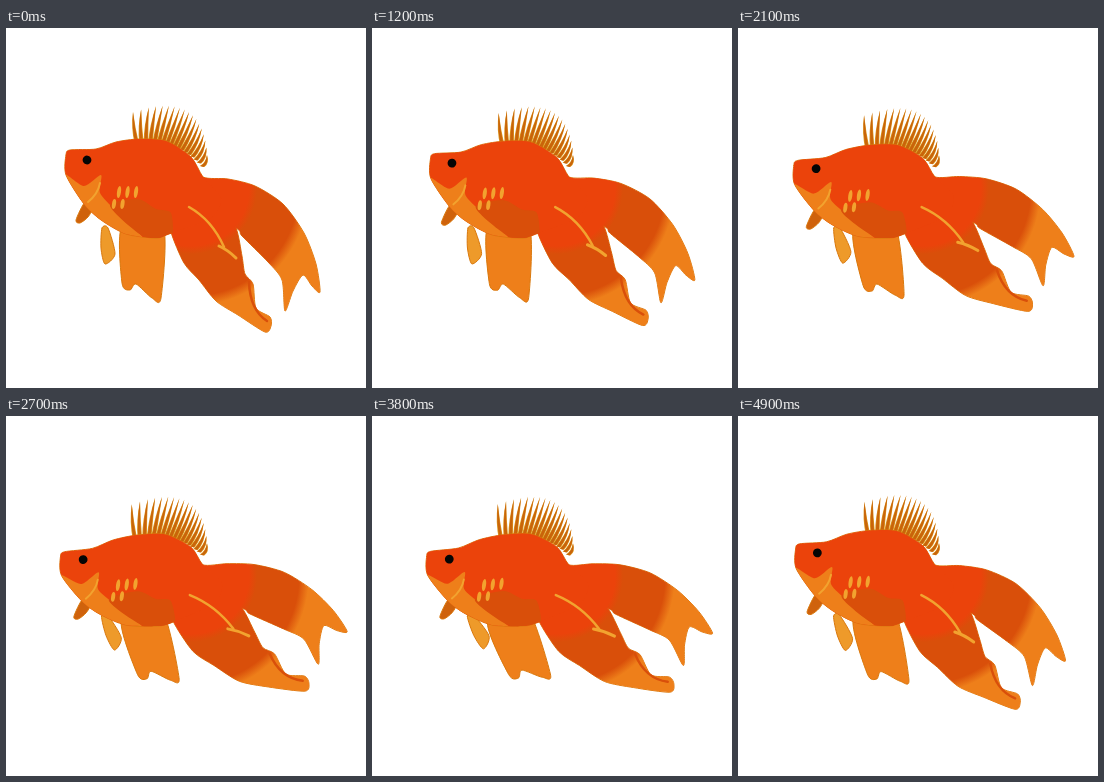
An HTML page with a canvas for the animation above (5000 ms loop, 360 by 360 pixels).

```html
<!DOCTYPE html>
<html lang="en">
<head>
<meta charset="utf-8">
<title>Goldfish</title>
<style>
html, body { margin: 0; width: 100%; height: 100%; overflow: hidden; background: #fff }
canvas { display: block; width: 360px; height: 360px }
</style>
</head>
<body>
<canvas width="360" height="360"></canvas>
<script>
const ctx = document.querySelector('canvas').getContext('2d');
const RED = '#eb430b', DARK = '#d94f0a', LIGHT = '#ee7f1a', GOLD = '#f2a32f', EDGE = '#d9780c';
const ROOT = [185, 160]; // the tail bends around this point

// Key points of the parts with the tail hanging.
const points = (...v) => v.flatMap((x, i) => i % 2 ? [] : [[x, v[i + 1]]]);
const BODY = points(60,127, 64,122, 90,121, 110,114, 133,111, 160,113, 185,129, 197,149, 215,170,
  205,190, 163,206, 150,210, 120,206, 95,192, 78,176, 60,147);
const UPPER = points(185,131, 197,149, 222,151, 249,158, 277,176, 298,205, 310,236, 314,264, 306,258,
  297,247, 287,263, 279,283, 276,252, 262,234, 236,208, 230,200, 180,170);
const LOWER = points(165,185, 190,165, 215,180, 230,200, 236,228, 239,246, 247,256, 250,280, 264,289,
  265,298, 259,304, 232,287, 210,273, 193,252, 178,235, 165,204);
const PELVIC = points(116,198, 116,255, 124,262, 130,256, 146,270, 155,270, 157,198);
const PECTORAL = points(96,200, 95,220, 99,236, 109,226, 102,200);
const SIDE_FIN = points(79,174, 70,192, 74,195, 82,189, 87,179);
const CHEEK = points(58,147, 78,158, 95,147, 94,165, 110,183, 140,215, 85,200);
const BELLY = points(104,178, 132,171, 150,181, 165,185, 165,212, 138,209);

// 0 = tail hanging, 1 = tail raised
const lift = t => (1 - Math.cos(Math.PI * (Math.max(t, 200) - 200) / 3000)) / 2;

function rotate([x, y], [cx, cy], angle) {
  const c = Math.cos(angle), s = Math.sin(angle), dx = x - cx, dy = y - cy;
  return [cx + dx * c + dy * s, cy + dy * c - dx * s];
}

// Behind the root the fish curls up, more so towards the tips; in front of it the head dips.
function bend([x, y], p) {
  const s = x - ROOT[0] + 0.7 * (y - ROOT[1]);
  return s > 0
    ? rotate([x, y], ROOT, 0.34 * p * (s / 185) ** 0.7)
    : [x - p * s * s * 0.00027, y - p * s * 0.1];
}

// Smooth closed curve through all points.
function outline(pts) {
  const n = pts.length, path = new Path2D(), s = 0.13;
  path.moveTo(...pts[0]);
  for (let i = 0; i < n; i++) {
    const [a, b, c, d] = [-1, 0, 1, 2].map(k => pts[(i + k + n) % n]);
    path.bezierCurveTo(b[0] + (c[0] - a[0]) * s, b[1] + (c[1] - a[1]) * s,
      c[0] - (d[0] - b[0]) * s, c[1] - (d[1] - b[1]) * s, ...c);
  }
  return path;
}

function fill(path, color) {
  ctx.fillStyle = color;
  ctx.fill(path);
}

function stroke(path, color = EDGE, width = 1) {
  ctx.strokeStyle = color;
  ctx.lineWidth = width;
  ctx.stroke(path);
}

function streak(p, width, color, ...coords) {
  const [a, b, c] = points(...coords).map(q => bend(q, p)), path = new Path2D();
  path.moveTo(...a);
  path.quadraticCurveTo(...b, ...c);
  stroke(path, color, width);
}

function oval([x, y], rx, ry, color) {
  const path = new Path2D();
  path.ellipse(x, y, rx, ry, 0.15, 0, 7);
  fill(path, color);
}

const quad = (a, b, c, u) =>
  a.map((v, k) => v * (1 - u) ** 2 + 2 * b[k] * u * (1 - u) + c[k] * u * u);

function dorsal(p) {
  const count = 18;
  for (let i = 0; i < count; i++) {
    const u = i / (count - 1);
    const [tx, ty] = bend(quad([127, 84], [198, 60], [201, 127], u), p * 0.4);
    const [bx, by] = bend(quad([131, 116], [170, 108], [196, 138], u), p);
    const mx = (tx + bx) / 2 - 2 + 5 * u, my = (ty + by) / 2 + 3 * u;
    for (const [w, color] of [[2.3, '#dd9a22'], [1.5, '#c9640a']]) {
      const spine = new Path2D();
      spine.moveTo(bx - w, by);
      spine.quadraticCurveTo(mx - w, my, tx, ty);
      spine.quadraticCurveTo(mx + w, my, bx + w, by + 1);
      fill(spine, color);
    }
  }
}

// The tail darkens and then lightens with distance from its root.
const tailColor = ctx.createRadialGradient(...ROOT, 0, ...ROOT, 200);
[[58, RED], [66, DARK], [108, DARK], [118, LIGHT]].forEach(([r, color]) => tailColor.addColorStop(r / 200, color));

function draw(t) {
  const p = lift(t), swing = 0.38 * lift(t - 500);
  const bent = part => outline(part.map(q => bend(q, p)));
  const swung = (part, pivot) => outline(part.map(q => rotate(q, pivot, swing)));
  ctx.fillStyle = '#fff';
  ctx.fillRect(0, 0, 360, 360);
  dorsal(p);

  const fins = [[swung(PELVIC, [135, 203]), LIGHT], [swung(PECTORAL, [97, 202]), '#ee9a2a'], [bent(SIDE_FIN), '#cf620c']];
  for (const [fin, color] of fins) {
    fill(fin, color);
    stroke(fin);
  }

  const [upper, lower, body] = [UPPER, LOWER, BODY].map(bent);
  for (const part of [upper, lower, body]) stroke(part);
  fill(upper, tailColor);
  fill(lower, tailColor);
  fill(body, RED);
  ctx.save();
  ctx.clip(body);
  fill(bent(CHEEK), LIGHT);
  fill(bent(BELLY), DARK);
  ctx.restore();

  ctx.lineCap = 'round';
  streak(p, 2.5, GOLD, 183,179, 206,192, 218,219);
  streak(p, 3, GOLD, 213,218, 222,222, 230,230);
  streak(p, 2, GOLD, 94,155, 92,166, 82,174);
  streak(p, 2.5, DARK, 243,254, 244,282, 261,293);

  for (let i = 0; i < 5; i++) {
    const row = i < 3 ? 0 : 1;
    oval(bend([113 + 8.5 * (i % 3) - 5 * row, 164 + 12 * row], p * 0.8), 2, 6 - row, GOLD);
  }
  oval(bend([81, 132], p), 4.4, 4.4, '#050505');
}

function frame() {
  draw(Math.floor(performance.now() % 5000 / 100) * 100);
  requestAnimationFrame(frame);
}
frame();
</script>
</body>
</html>
```
